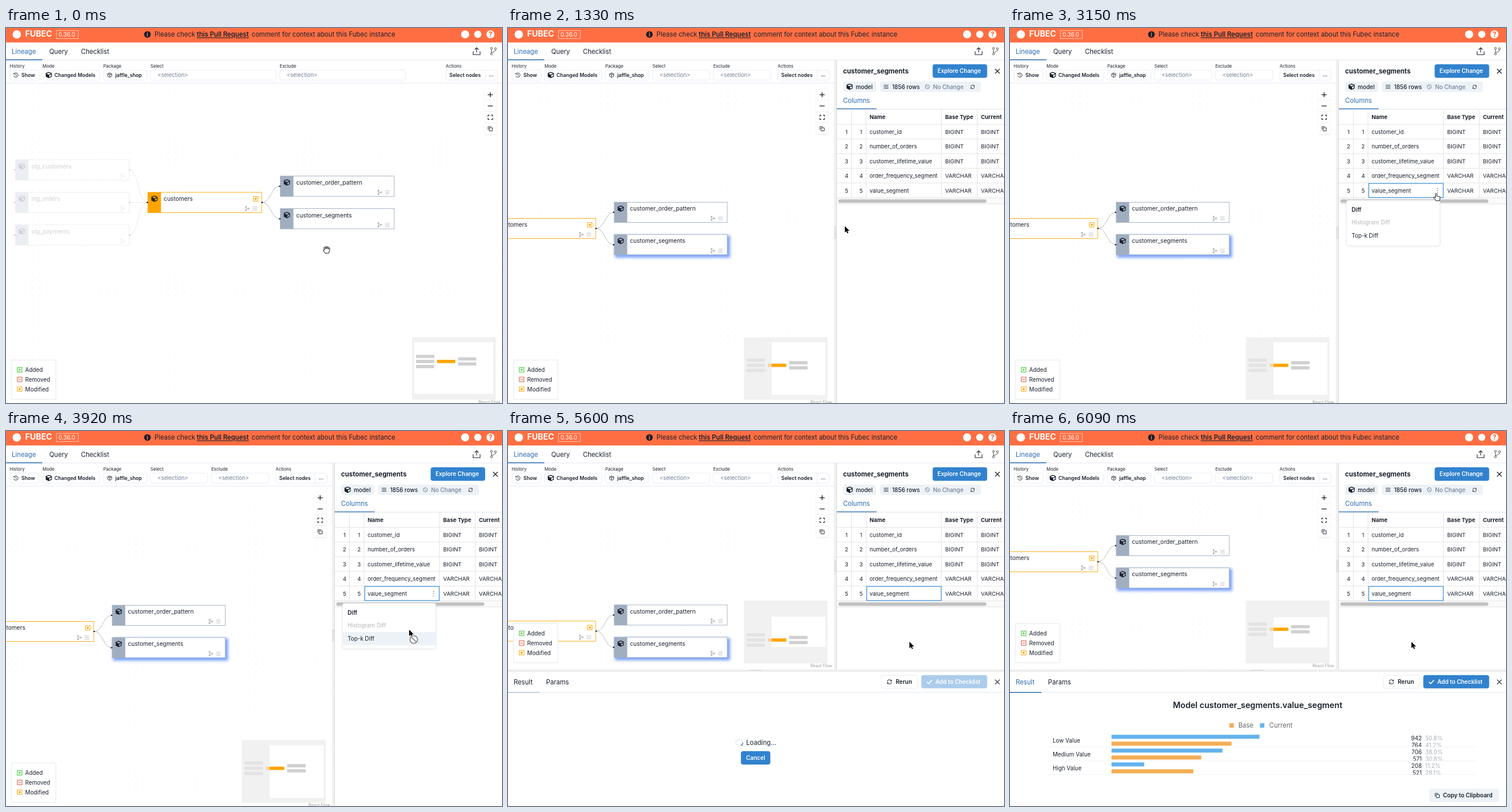
Animation of 860 by 651 pixels, one loop 7.7 s. Source, as an HTML page:

```html
<!DOCTYPE html>
<html lang="en">
<head>
<meta charset="utf-8">
<title>Lineage</title>
<style>
html, body { margin: 0; width: 100%; height: 100%; overflow: hidden; background: #fff; }
svg { display: block; font-family: Inter, sans-serif; }
text { white-space: pre; }
</style>
</head>
<body>
<svg id="stage" width="860" height="651" viewBox="0 0 860 651"></svg>
<script>
const INK = '#1a202c', LINE = '#e2e8f0', BLUE = '#3182ce', DEEP = '#2b6cb0',
      SLATE = '#a0aec0', PALE = '#edf2f7', ORANGE = '#ffa500', BRAND = '#ff6e42';
const LOOP = 7700, STEP = 70;

// ---- drawing helpers ----
const text = (x, y, s, size = 9.8, weight = 400, fill = INK, extra = '') =>
  `<text x="${x}" y="${y}" font-size="${size}" font-weight="${weight}" fill="${fill}" ${extra}>${s}</text>`;
const mid = 'text-anchor="middle"';
const rect = (x, y, x2, y2, fill = '#fff', extra = '') =>
  `<rect x="${x}" y="${y}" width="${x2 - x}" height="${y2 - y}" fill="${fill}" ${extra}/>`;
const box = (x, y, x2, y2, fill = '#fff', stroke = LINE, r = 3, extra = '') =>
  rect(x, y, x2, y2, fill, `stroke="${stroke}" stroke-width=".8" rx="${r}" ${extra}`);
const path = (d, stroke = INK, w = 1, fill = 'none', extra = '') =>
  `<path d="${d}" fill="${fill}" stroke="${stroke}" stroke-width="${w}" ${extra}/>`;
const dot = (x, y, r, fill = INK) => `<circle cx="${x}" cy="${y}" r="${r}" fill="${fill}"/>`;
const at = (x, y, s, extra = '') => `<g transform="translate(${x} ${y})" ${extra}>${s}</g>`;
const group = (id, s, extra = '') => `<g id="${id}" ${extra}>${s}</g>`;
const hline = (x, x2, y, c = LINE, w = 1) => path(`M${x} ${y}H${x2}`, c, w);
const vline = (x, y, y2, c = LINE, w = 1) => path(`M${x} ${y}V${y2}`, c, w);

// ---- icons, centred on x, y ----
const cube = (x, y) => at(x, y, path(
  'M0-5.5L5.3-3.5V2.7L0 5.4L-5.3 2.7V-3.5ZM0-4L4.1-2.5L0-.8L-4.1-2.5ZM.7 3.6V.4L4.1-1V1.9Z',
  'none', 0, INK, 'fill-rule="evenodd"'));
const boxIcon = (x, y) => at(x, y,
  path('M0-4L3.6-2V2L0 4L-3.6 2V-2ZM-3.6-2L0 0L3.6-2M0 0V4M-1.8-3L1.8-1', INK, .8));
const tree = (x, y) => at(x, y,
  path('M-2-3V3M-2 0H2', '#b5b5b5', .9) +
  [[-2, -3], [-2, 3], [2.4, 0]].map(([a, b]) => rect(a - 1.4, b - 1.4, a + 1.4, b + 1.4, '#b5b5b5')).join(''));
const list = (x, y, c = '#c0c0c0') => at(x, y, path('M-4-2.7H4M-4 0H4M-4 2.7H4', c, .9));
const close = (x, y) => at(x, y, path('M-4-4L4 4M4-4L-4 4', INK, 1.2));
const refresh = (x, y, k = 1) => at(x, y,
  path('M-3.8-.2A3.8 3.8 0 0 1 3-2.3M3.8.2A3.8 3.8 0 0 1-3 2.3', INK, 1) +
  path('M4-4V-1H1ZM-4 4V1H-1Z', 'none', 0, INK)).replace(')"', `) scale(${k})"`);
const copy = (x, y) => at(x, y, path('M-3.6 1.8V-3.6H1.8M-1.6-1.6H3.8V3.8H-1.6Z', INK, .9));
const ban = (x, y, r, c, w) => at(x, y,
  `<circle r="${r}" fill="none" stroke="${c}" stroke-width="${w}"/>` + path(`M${-r * .7} ${-r * .7}L${r * .7} ${r * .7}`, c, w));
const badge = (x, y, c, mark) => at(x, y,
  rect(-4, -4, 4, 4, '#fff', `stroke="${c}" stroke-width="1"`) + mark);
const modified = (x, y) => badge(x, y, ORANGE, dot(0, 0, 1.9, ORANGE));
const grip = (x, y, cols, rows) => {
  let s = '';
  for (let i = 0; i < cols; i++) for (let j = 0; j < rows; j++)
    s += rect(x + i * 2.7, y + j * 2.7, x + i * 2.7 + 1.3, y + j * 2.7 + 1.3, '#bdbdbd');
  return s;
};

// ---- header ----
const header = () =>
  rect(0, 0, 860, 25.3, BRAND) + dot(18.7, 11.2, 7.3, '#fff') +
  text(33.3, 15.3, 'FUBEC', 14, 700, '#fff') +
  rect(87.5, 4.2, 125.3, 18.3, 'none', 'stroke="#fff" stroke-opacity=".75" stroke-width=".8"') +
  text(91, 15, '0.36.0', 9.8, 400, '#fff') +
  dot(245.2, 11.2, 5.8) + text(245.2, 14.7, 'i', 9.5, 700, BRAND, mid) +
  text(257.6, 15.4, 'Please check', 11.2) +
  text(330.7, 15.4, 'this Pull Request', 11.25, 600, INK, 'text-decoration="underline"') +
  text(426, 15.4, 'comment for context about this Fubec instance', 11.2) +
  dot(796, 11, 7, '#fff') + dot(818, 11, 6.2, '#fff') + dot(840, 11, 7, '#fff') +
  text(840, 15.2, '?', 11.5, 800, BRAND, mid) +
  rect(0, 25.3, 860, 56) + hline(0, 860, 55.6) +
  text(10, 44.5, 'Lineage', 11.2, 400, DEEP) + hline(0, 63, 55.2, DEEP, 1.4) +
  text(75, 44.5, 'Query', 11.2) + text(130, 44.5, 'Checklist', 11.2) +
  at(816, 40, path('M-6 .5V6.3H6V.5M0 2.5V-5.5M-3.3-2.5L0-5.8L3.3-2.5', INK, 1.1)) +
  at(845, 40, path('M-3.3-3V4M3.6-2.5C3.6 2-1 1-3.3 3', '#555', 1) +
    [[-3.3, -4.7], [-3.3, 5], [3.6, -4]].map(([x, y]) =>
      `<circle cx="${x}" cy="${y}" r="1.7" fill="#fff" stroke="#555"/>`).join(''));

const field = (x, x2, name) =>
  text(x, 69, name, 7.7) + box(x, 73, x2, 90.4) +
  text(x + 12.2, 85.3, '&lt;selection&gt;', 9.5, 400, '#718096');

const toolbar = (right, selEnd, exc, excEnd) =>
  rect(0, 56, right, 95.6) + hline(0, right, 95.5) +
  text(6.3, 69, 'History', 7.7) + text(63.3, 69, 'Mode', 7.7) + text(168.7, 69, 'Package', 7.7) +
  box(7, 73, 57.3, 90.4) + box(63.5, 73, 162.5, 90.4) + box(169, 73, 244.2, 90.4) +
  at(17.2, 81.7, path('M-3-2.2A3.7 3.7 0 1 1-3.6 1M-3.7-3.7V-1.7H-1.7M0-2V.2L1.6 1.2', INK, .9)) +
  text(26.8, 84.8, 'Show', 8.7, 600) + cube(74.2, 81.7) + text(84, 84.8, 'Changed Models', 8.7, 600) +
  boxIcon(179.8, 81.7) + text(189.5, 84.8, 'jaffle_shop', 8.7, 600) +
  field(250.5, selEnd, 'Select') + field(exc, excEnd, 'Exclude') +
  at(right - 860, 0, text(762.6, 68.7, 'Actions', 7.7) + box(763, 73, 852, 90.4) + vline(831, 73, 90.4, LINE, .8) +
    text(768.8, 84.8, 'Select nodes', 8.7, 600) + text(841.3, 84.3, '...', 8.7, 600, INK, mid));

// ---- graph ----
const W = 197.3, H = 35.3;
const node = (id, x, y, label, o = {}) => {
  const c = o.color || SLATE;
  return group(id,
    (o.glow ? group('glow', rect(x + 1.4, y + 1.4, x + W + 5, y + H + 5, '#2a6af5', 'opacity=".62" filter="url(#blur)"')) : '') +
    rect(x, y, x + W, y + H, '#fff', `stroke="${c}" stroke-width=".9" ${o.glow ? 'id="face"' : ''}`) +
    rect(x, y, x + 22.7, y + H, c) + cube(x + 11.3, y + 11.3) +
    text(x + 27.6, y + 15, label, 10.15) +
    (o.list ? tree(x + 172, y + 28.3) + list(x + 185.5, y + 28.3) : tree(x + 186, y + 28.3)) +
    (o.color ? modified(x + 187, y + 11.3) : '') +
    dot(x - 1, y + 17.7, 1.3) + (o.leaf ? '' : dot(x + W + .8, y + 17.7, 1.3)));
};
const edge = (id, x, y, x2, y2) => {
  const m = (x + x2) / 2;
  return path(`M${x} ${y}C${m} ${y} ${m} ${y2} ${x2} ${y2}`, '#a9a9b0', .8, 'none', `id="${id}"`);
};
const parents = ['stg_customers', 'stg_orders', 'stg_payments'];
const graph = () => group('graph',
  rect(-800, -400, 1800, 1300, 'url(#grid)') +
  parents.map((_, i) => edge('in' + i, 214, 246.3 + i * 56.5, 245, 302.7)).join('') +
  edge('outA', 444, 302.7, 475, 274.7) + edge('outB', 444, 302.7, 475, 331) +
  parents.map((n, i) => node('stg' + i, 16.2, 228.7 + i * 56.5, n)).join('') +
  node('main', 246, 285.2, 'customers', { color: ORANGE, list: true }) +
  node('pattern', 475.7, 257, 'customer_order_pattern', { list: true, leaf: true }) +
  node('segments', 475.7, 313.5, 'customer_segments', { list: true, leaf: true, glow: true }));

const controls = () => group('controls',
  rect(829.7, 105.7, 850, 184.5, '#fff', 'filter="url(#soft)"') +
  [125.3, 145, 164.6, 184.3].map(y => hline(830, 850, y, '#eee', .8)).join('') +
  path('M835.3 115.8H844M839.6 111.5V120.1M835.3 135.3H844', INK, 1.3) +
  at(839.7, 155, path('M-4-1.3V-3.6H-1.6M1.6-3.6H4V-1.3M4 1.3V3.6H1.6M-1.6 3.6H-4V1.3', INK, 1.1)) +
  copy(839.5, 174.8));

const legend = () => {
  const rows = [
    ['Added', '#38c72b', path('M-2.2 0H2.2M0-2.2V2.2', '#38c72b')],
    ['Removed', '#e0543a', path('M-2.2 0H2.2', '#e0543a')],
    ['Modified', ORANGE, dot(0, 0, 1.9, ORANGE)]];
  return group('legend', box(9.8, 576.3, 86.5, 644.6, '#fff', '#dde3ea', 0) +
    rows.map(([n, c, m], i) => badge(23.7, 593.3 + i * 16.8, c, m) + text(33.3, 597 + i * 16.8, n)).join(''));
};

const minimap = () => {
  const bar = (x, y, c = '#d0d0d0') => rect(x, y + .1, x + 31.6, y + 5.7, c);
  return group('map', rect(0, 0, 145, 108.5) +
    group('mapNodes', bar(0, 0) + bar(0, 8.8) + bar(0, 17.6) + bar(36.4, 8.8, ORANGE) + bar(72.8, 4.4) + bar(72.8, 13.1)) +
    '<path id="mask" fill="#ececec" fill-opacity=".7" fill-rule="evenodd"/>');
};

// ---- right panel ----
const columns = [['customer_id', 'BIGINT'], ['number_of_orders', 'BIGINT'], ['customer_lifetime_value', 'BIGINT'],
  ['order_frequency_segment', 'VARCHAR'], ['value_segment', 'VARCHAR']];
const panel = () => group('panel',
  rect(565, 56, 860, 651) + rect(565, 56, 570, 651, '#f1f1f1') + vline(569.6, 56, 651, '#cfcfcf', .8) +
  group('grip', grip(565.8, 345, 2, 8)) +
  text(581, 78.6, 'customer_segments', 11.4, 700) +
  rect(736.3, 63, 830.8, 86.4, BLUE, 'rx="4"') + text(744.7, 78, 'Explore Change', 9.9, 600, '#fff') + close(848.5, 75) +
  rect(581.3, 93, 638.3, 111, PALE, 'rx="4"') + cube(592.3, 102) + text(603, 105.6, 'model', 9.9, 500) +
  rect(645, 93, 820, 111, PALE, 'rx="4"') + list(655.5, 102, INK) + text(666, 105.6, '1856 rows', 9.9, 500) +
  ban(727, 102, 3.6, '#718096', .9) + text(737, 105.6, 'No Change', 9.9, 500, '#718096') + refresh(805.5, 102.3, .85) +
  text(581, 130, 'Columns', 11.2, 400, DEEP) + hline(570, 860, 141, '#dde3ea') + hline(570, 639, 140.4, DEEP, 1.4) +
  [595.5, 620.8, 751.5, 813.5].map(x => vline(x, 141.5, 295, '#ddd', .8)).join('') +
  text(627, 158.2, 'Name', 9.6, 700) + text(758, 158.2, 'Base Type', 9.6, 700) + text(820, 158.2, 'Current', 9.6, 700) +
  columns.map(([n, type], i) => {
    const y = 183.8 + i * 25.45;
    return hline(570, 860, y - 16.5, '#ddd', .8) + text(587, y, i + 1, 9.6, 400, INK, mid) +
      text(612.3, y, i + 1, 9.6, 400, INK, mid) + text(627, y, n, 9.6) + text(758, y, type, 9.6) + text(820, y, type, 9.6);
  }).join('') +
  rect(570, 295, 860, 305.3, '#fafafa') + hline(570, 860, 294.8, '#ddd', .8) + hline(570, 860, 305.3, '#ddd', .8) +
  rect(572.8, 297.6, 829.5, 303.6, '#c1c1c1', 'rx="3"') +
  group('cell', rect(622, 269.8, 751.2, 294.3, 'none', 'stroke="#4a98de" stroke-width="1.3"')) +
  group('kebab', [278.5, 282.3, 286].map(y => dot(741.3, y, .75, '#4a5568')).join('')) +
  group('menu', box(583.3, 299, 745.5, 378, '#fff', LINE, 4, 'filter="url(#soft)"') +
    rect(583.7, 349, 745.1, 372, PALE, 'id="pick"') + text(592.3, 318.8, 'Diff', 9.8, 600) +
    text(592.3, 341, 'Histogram Diff', 9.8, 400, '#b3b6ba') + text(592.3, 364.3, 'Top-k Diff')));

// ---- bottom panel ----
const values = [['Low Value', 942, '50.8%', 764, '41.2%'], ['Medium Value', 706, '38.0%', 571, '30.8%'],
  ['High Value', 208, '11.2%', 521, '28.1%']];
const count = (y, n, share, c) =>
  rect(176, y - 9.3, 176 + n * .2724, y - 2.3, c) + text(714, y, n, 9.8, 400, INK, 'text-anchor="end"') +
  text(720, y, share, 9.8, 400, '#a8b0bb');
const bottom = () => group('bottom',
  rect(0, 414.3, 860, 651) + rect(0, 414.3, 860, 418, '#ededed') + grip(418.5, 414.6, 8, 1) +
  hline(0, 860, 453.7) +
  group('tabOff', text(10, 440, 'Result', 11.2) + hline(0, 54.5, 453.8, '#b5bfcc', 1.4)) +
  group('tabOn', text(10, 440, 'Result', 11.2, 400, DEEP) + hline(0, 54.5, 453.8, DEEP, 1.4)) +
  text(66, 440, 'Params', 11.2) +
  box(647.2, 424, 710.6, 446.8, '#fff', LINE, 4) + refresh(661.3, 435.5) + text(672.3, 438.8, 'Rerun', 9.9, 600) +
  group('add', rect(716.6, 423.8, 830.8, 446.8, BLUE, 'rx="4"') + path('M726.3 435.6L729.3 438.6L735 432.6', '#fff', 1.7) +
    text(741, 438.6, 'Add to Checklist', 9.9, 600, '#fff')) + close(848.5, 435.6) +
  group('loading', at(401, 541.2, '<circle r="6" fill="none" stroke="#e2e8f0" stroke-width="1.2"/>' +
      path('M6 0A6 6 0 0 1 3 5.2', BLUE, 1.4, 'none', 'id="spin"')) +
    text(413, 545.2, 'Loading...', 11.2) + rect(403.8, 555.7, 454.8, 579, BLUE, 'rx="4"') +
    text(429.3, 570.8, 'Cancel', 9.9, 600, '#fff', mid)) +
  group('result', text(429.3, 480.6, 'Model customer_segments.value_segment', 14.2, 600, INK, mid) +
    rect(380.3, 507.3, 388, 515, '#f6ad55') + text(396, 515, 'Base', 11.2, 400, '#666') +
    rect(433.4, 507.3, 441, 515, '#63b3ed') + text(449.6, 515, 'Current', 11.2, 400, '#666') +
    values.map(([n, cur, curPct, base, basePct], i) => {
      const y = 536.6 + i * 24;
      return text(74, y + 4, n) + count(y, cur, curPct, '#63b3ed') + count(y + 12, base, basePct, '#f6ad55') +
        hline(64, 808, y + 11.8, '#edf0f3', .7);
    }).join('') +
    rect(727.3, 621.3, 848, 644.2, PALE, 'rx="4"') + copy(740.7, 632.7) + text(750.8, 636.3, 'Copy to Clipboard', 9.9, 600)));

// ---- pointer ----
const pointers = () => group('cursor',
  group('grab', path('M-2.6 6Q-5.5 2.5-6 .6Q-5.4-.8-3.8 .6L-4.9-3.4Q-4.6-5-3.2-4L-2-1.4L-2.2-5Q-1.2-6.8-.1-5.2L.1-1.6L1-5Q2.2-6.2 2.8-4.6L2.4-1L4-3.4Q5.4-4 5.4-2.4L4.6 2.4Q4 4.6 3.4 6Z', '#111', 1, '#fff', 'stroke-linejoin="round"')) +
  group('arrow', path('M0 0V11L2.6 8.7L4.3 12.6L6.1 11.8L4.4 8H8Z', '#fff', 1.2, '#000', 'paint-order="stroke"')) +
  group('hand', path('M-1.2 7.4V1A1.2 1.2 0 0 1 1.2 1V4.6Q2.4 4 3.2 4.9Q4.4 4.4 5 5.3Q6.4 5 6.6 6.5V8.6Q6.4 10.6 5.4 11.6V12.4H-.6V11.6Q-2.4 9.8-4.2 7.4Q-4.6 6-3 6.1Q-2 6.4-1.2 7.4Z', '#111', 1, '#fff', 'stroke-linejoin="round"')) +
  group('deny', dot(8, 17, 7.6, '#fff') + ban(8, 17, 6.6, '#8d8d8d', 1.9)));

document.getElementById('stage').innerHTML =
  `<defs>
    <pattern id="grid" width="13.1" height="13.1" patternUnits="userSpaceOnUse">${dot(6, 6, .5, '#dcdcdc')}</pattern>
    <filter id="blur" x="-20%" y="-60%" width="140%" height="220%"><feGaussianBlur stdDeviation="2.5"/></filter>
    <filter id="soft" x="-20%" y="-20%" width="140%" height="140%"><feDropShadow dx="0" dy=".7" stdDeviation="1" flood-opacity=".1"/></filter>
  </defs>` +
  rect(0, 0, 860, 651) + graph() + controls() + minimap() + legend() +
  text(819.6, 652, 'React Flow', 7.2, 400, '#999', 'id="credit"') +
  group('tip', rect(519.3, 289, 629.4, 307.6, '#2d3748', 'rx="1.5"') +
    text(574.3, 302, 'customer_segments', 9.9, 500, '#fff', mid)) +
  group('barWide', toolbar(860, 468.3, 474.6, 692.4)) + group('barSlim', toolbar(565, 349.8, 356, 455.8)) +
  panel() + bottom() + header() + pointers();

// ---- timeline ----
const el = {};
document.querySelectorAll('[id]').forEach(e => el[e.id] = e);
const show = (id, on) => { el[id].style.display = on ? '' : 'none'; };
const fade = (id, o) => { el[id].style.opacity = o; };
const move = (id, x, y, more = '') => el[id].setAttribute('transform', `translate(${x} ${y}) ${more}`);
const ramp = (t, a, b) => Math.min(1, Math.max(0, (t - a) / (b - a)));
const cubic = k => k < .5 ? 4 * k ** 3 : 1 - (2 - 2 * k) ** 3 / 2;
const mix = (a, b, k) => a + (b - a) * k;

const HOVER = 630, OPEN = 1120, POINT = 2380, CLICK = 2940, CHOOSE = 4690, RUN = 5600, DONE = 5880;
const track = [[210, 556, 385], [420, 566, 372], [630, 580, 348], [840, 584, 344], [1820, 584, 344],
  [2030, 620, 334], [2240, 703, 305], [2450, 740, 290], [2660, 740, 290], [2870, 741, 284], [3080, 741, 284],
  [3500, 729, 305], [3920, 699, 345], [4060, 697, 358], [4340, 696, 366]];
const shapes = [[0, 'grab'], [HOVER, 'arrow'], [POINT, 'hand'], [3290, 'arrow'], [3780, 'deny'], [3990, 'hand'], [4760, 'arrow']];

function place(t) {
  let i = track.findIndex(p => p[0] > t);
  if (i < 0) i = track.length;
  const a = track[Math.max(0, i - 1)], b = track[Math.min(i, track.length - 1)];
  const k = a === b ? 0 : ramp(t, a[0], b[0]);
  move('cursor', mix(a[1], b[1], k), mix(a[2], b[2], k));
  const shape = shapes.filter(s => s[0] <= t).pop()[1];
  ['grab', 'hand', 'deny'].forEach(id => show(id, id === shape));
  show('arrow', shape === 'arrow' || shape === 'deny');
}

function render(t) {
  const open = t >= OPEN, run = t >= RUN, done = t >= DONE;
  const hover = t >= HOVER && !open;
  const pan = cubic(ramp(t, OPEN, 1330)), lift = cubic(ramp(t, RUN - 25, DONE - 70));
  const dx = open ? -295 : 0, dy = run ? -242 : 0;

  move('graph', -288.2 * pan, 47.3 * pan - 121 * lift, `scale(${1 - .007 * pan})`);
  const up = t < HOVER ? .2 : 1;
  parents.forEach((_, i) => { fade('stg' + i, up); fade('in' + i, up === 1 ? 1 : .3); });
  fade('pattern', hover ? .2 : 1);
  fade('outA', hover ? .3 : 1);
  el.face.setAttribute('fill', hover ? '#ecf1f6' : '#fff');
  show('glow', open);
  show('tip', hover);
  fade('tip', ramp(t, 700, 910));

  move('controls', dx, 0);
  move('legend', 0, dy);
  move('credit', dx, dy);
  move('map', 704 + dx, 536.7 + dy);
  move('mapNodes', mix(7, 4.5, pan), mix(30.5, 37, pan) + (run ? mix(19.4, .6, lift) : 0), `scale(${1 + .015 * pan})`);
  const x = mix(4, 48, pan), w = mix(137, 93.5, pan), y = run ? mix(27.5, 28.5, lift) : 8.8, h = run ? 52.6 : mix(89.5, 91.5, pan);
  el.mask.setAttribute('d', `M0 0H145V108.5H0ZM${x} ${y}h${w}v${h}h${-w}Z`);

  show('barWide', !open);
  show('barSlim', open);
  show('panel', open);
  move('grip', 0, run ? -121 : 0);
  show('cell', t >= CLICK);
  show('kebab', t >= POINT && t < 4760);
  const menu = ramp(t, CLICK - 70, CLICK + 140) * (1 - ramp(t, CHOOSE - 70, 4900));
  show('menu', t >= CLICK && menu > 0);
  fade('menu', menu);
  move('menu', 583, 299, `scale(${.8 + .2 * menu}) translate(-583 -299)`);
  show('pick', t >= 3920);

  show('bottom', run);
  const tab = ramp(t, RUN, 5810);
  fade('tabOff', 1 - tab);
  fade('tabOn', tab);
  fade('add', mix(.4, 1, ramp(t, DONE, 6090)));
  show('loading', !done);
  show('result', done);
  el.spin.setAttribute('transform', `rotate(${(t - RUN) / 650 * 360})`);
  place(t);
}

const start = performance.now();
function tick() {
  const t = (performance.now() - start) % LOOP;
  render(Math.floor(t / STEP) * STEP);
  requestAnimationFrame(tick);
}
tick();
</script>
</body>
</html>
```
